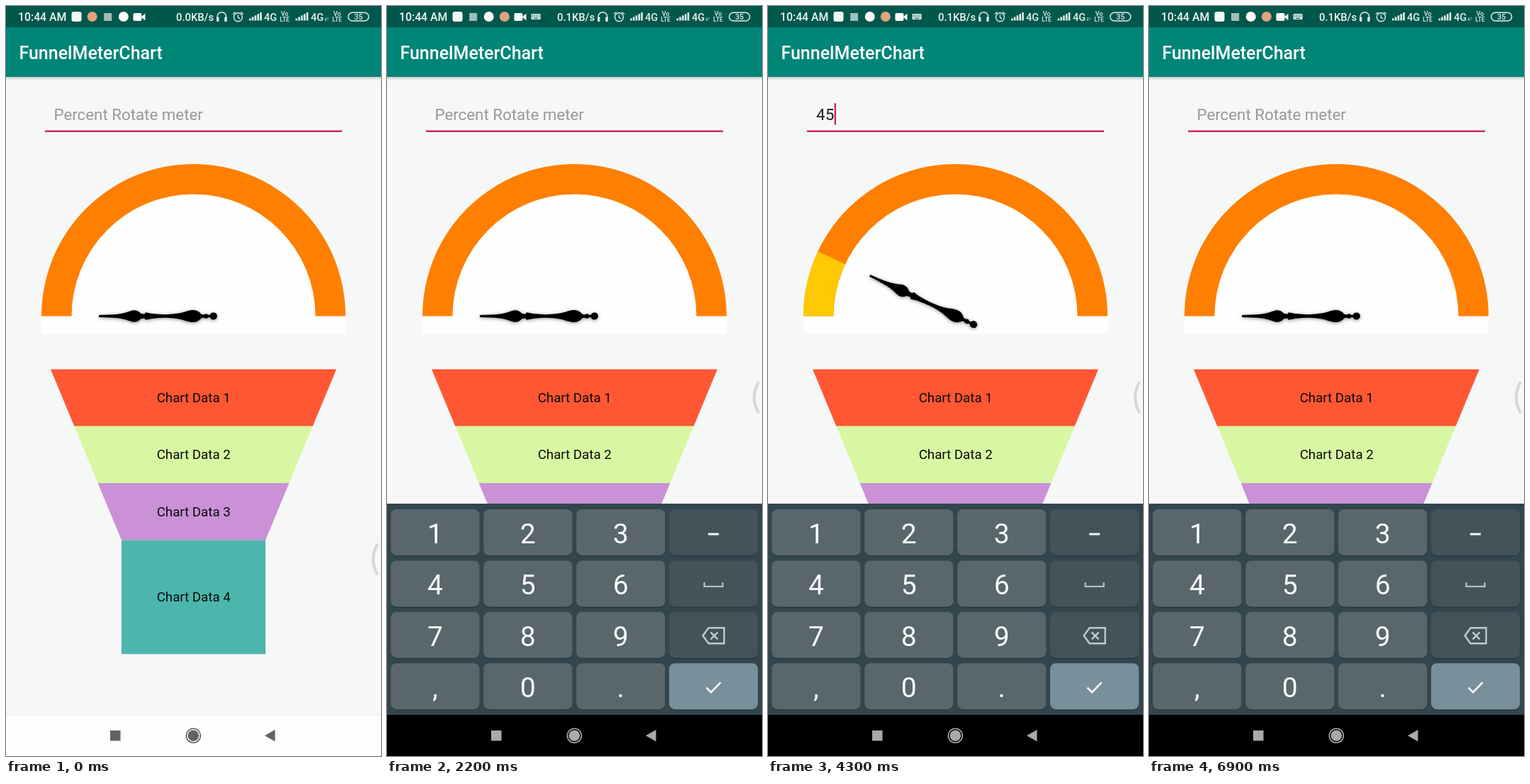
An HTML page with a canvas that plays this animation: 529x1058 px, repeating every 7000 ms.

```html
<!DOCTYPE html>
<html lang="en">
<head>
<meta charset="utf-8">
<title>FunnelMeterChart</title>
<style>
html, body { margin: 0; width: 100%; height: 100%; overflow: hidden; background: #f6f8f8; }
canvas { display: block; width: 100vw; height: 100vh; }
</style>
</head>
<body>
<canvas id="stage" width="529" height="1058"></canvas>
<script>
const ctx = document.getElementById('stage').getContext('2d');
const LOOP = 7000, STEP = 100, BLINK = 522, MS_PER_PERCENT = 10;
const FONT = 'Roboto, "Noto Sans", sans-serif';
const CX = 264.5, CY = 437.5, R_OUT = 214.5, R_IN = 172;

// [time, field text]
const edits = [[400, ''], [3760, '4'], [4160, '45'], [5260, '4'], [6160, '']];
// [from, to, key row, key column]
const presses = [
  [2500, 2900, 2, 3], [3600, 3800, 1, 0], [4000, 4200, 1, 1],
  [5200, 5400, 2, 3], [6100, 6300, 2, 3]
];
const KEYS = [['1', '2', '3', 'minus'], ['4', '5', '6', 'space'],
  ['7', '8', '9', 'delete'], [',', '0', '.', 'enter']];

function rect(x, y, w, h, color) {
  ctx.fillStyle = color;
  ctx.fillRect(x, y, w, h);
}

function text(str, x, y, size, color, align = 'left', weight = 400) {
  ctx.font = `${weight} ${size}px ${FONT}`;
  ctx.textAlign = align;
  ctx.fillStyle = color;
  ctx.fillText(str, x, y);
}

function disc(x, y, r, color) {
  ctx.fillStyle = color;
  ctx.beginPath();
  ctx.arc(x, y, r, 0, Math.PI * 2);
  ctx.fill();
}

function round(x, y, w, h, r, color) {
  ctx.fillStyle = color;
  ctx.beginPath();
  ctx.roundRect(x, y, w, h, r);
  ctx.fill();
}

function fillPath(d, color) {
  ctx.fillStyle = color;
  ctx.fill(new Path2D(d));
}

function strokePath(d, color, width) {
  ctx.strokeStyle = color;
  ctx.lineWidth = width;
  ctx.stroke(new Path2D(d));
}

function signal(x) {
  for (let i = 0; i < 5; i++) {
    const h = 3 + i * 2.1;
    rect(x + i * 3.8, 20.5 - h, 2.6, h, '#e6f0ee');
  }
}

function volte(x) {
  text('Vo', x, 13.5, 9, '#e6f0ee', 'center', 500);
  text('LTE', x, 22, 8.5, '#e6f0ee', 'center', 500);
}

const statusIcons = {
  app: x => round(x - 7, 8, 14, 14, 3, '#f2f8f7'),
  pulse: x => disc(x, 15, 7, '#e5a27e'),
  mini: x => rect(x - 5.5, 10, 11, 11, '#9fc0ba'),
  chat: x => disc(x, 15, 7, '#ffffff'),
  video: x => {
    round(x - 8.5, 10, 12, 11, 2, '#fff');
    fillPath(`M${x + 3} 15.5L${x + 8.5} 10.5V20.5Z`, '#fff');
  },
  keys: x => {
    round(x - 6.5, 11, 13, 8, 1, '#dcebe8');
    for (let i = 0; i < 8; i++) {
      rect(x - 5 + (i % 4) * 2.8, 12.5 + (i >> 2) * 2.2, 1.3, 1.2, '#00574b');
    }
    rect(x - 3, 17, 6, 1, '#00574b');
  }
};

function statusBar(t) {
  rect(0, 0, 529, 30, '#00574b');
  text('10:44 AM', 17, 21, 15.8, '#f0f7f6', 'left', 500);
  const order = t < 1700 ? ['app', 'pulse', 'mini', 'chat', 'video']
    : ['app', 'mini', 'chat', 'pulse', 'video', 'keys'];
  order.forEach((name, i) => statusIcons[name](99.5 + i * 22.1));
  text(t < 1800 ? '0.0KB/s' : '0.1KB/s', 240, 20.5, 14.8, '#f0f7f6', 'left', 500);

  const ink = '#e6f0ee';
  strokePath('M298 18V15A6.3 6.3 0 0 1 310.6 15V18', ink, 1.5);
  round(297, 15.5, 3.4, 6.5, 1, ink);
  round(308.2, 15.5, 3.4, 6.5, 1, ink);
  strokePath('M333.4 15.8A6 6 0 1 0 321.4 15.8A6 6 0 1 0 333.4 15.8M327.4 12.5V16.3L330 17.8M320 11.5L323.5 8.5M334.8 11.5L331.3 8.5', ink, 1.4);
  signal(343);
  text('4G', 364, 20.5, 14.6, ink, 'left', 500);
  volte(393);
  signal(408.5);
  text('4G', 430, 20.5, 14.6, ink, 'left', 500);
  strokePath('M451 16V20.5M449.8 19L451 20.5L452.2 19', ink, 0.8);
  strokePath('M454 20.5V16M452.8 17.5L454 16L455.2 17.5', '#7fa9a3', 0.8);
  volte(467);
  ctx.strokeStyle = ink;
  ctx.lineWidth = 1.4;
  ctx.beginPath();
  ctx.roundRect(482.7, 9.2, 29, 11.8, 5.9);
  ctx.stroke();
  text('35', 497.2, 18.8, 10.5, ink, 'center', 500);
}

function header(t) {
  rect(0, 30, 529, 70, '#008577');
  const shade = ctx.createLinearGradient(0, 100, 0, 105);
  shade.addColorStop(0, 'rgba(0,0,0,.18)');
  shade.addColorStop(1, 'rgba(0,0,0,0)');
  rect(0, 100, 529, 5, shade);
  text('FunnelMeterChart', 18.5, 74.5, 25, '#fff', 'left', 500);
  statusBar(t);
}

function field(t, [since, value]) {
  if (value) text(value, 68, 161, 22.5, '#1c1c1c');
  else text('Percent Rotate meter', 67.5, 161, 22.3, '#979998');
  rect(55, 175.5, 419, 2.3, '#cf1655');
  if (t >= 400 && (t - since) % (2 * BLINK) < BLINK) {
    rect(68.5 + value.length * 12.6, 137, 2.2, 30.5, '#cf1655');
  }
}

function ring(from, to, color) {
  ctx.fillStyle = color;
  ctx.beginPath();
  ctx.arc(CX, CY, R_OUT, from, to);
  ctx.arc(CX, CY, R_IN, to, from, true);
  ctx.fill();
}

// Upper half of the hand, mirrored to make the whole.
const hand = new Path2D();
const half = new Path2D('M-134 0V-1.5C-112 -1.8 -100 -3 -90 -7C-84 -9.5 -78 -8 -74.5 -3.4' +
  'Q-72 -3.8 -70 -2.8L-68 -5.2L-59 -3.4Q-36 -1 -20 -4.2C-10 -6.5 -8 -8.6 0 -8.6C5 -8.6 8 -5.5 11 -2.6' +
  'Q14 -1.5 16 -3Q18.5 -4 20 -1.8H22.8A5.2 5.2 0 0 1 32.8 0Z');
hand.addPath(half);
hand.addPath(half, new DOMMatrix([1, 0, 0, -1, 0, 0]));

function gauge(percent) {
  const turn = percent * Math.PI / 100;
  ctx.save();
  ctx.beginPath();
  ctx.rect(50, 223, 429, 239);
  ctx.clip();
  disc(CX, CY, R_OUT - 1, '#fdfefd');
  rect(50, 437, 429, 25, '#fdfefd');
  ring(Math.PI, Math.PI * 2, '#ff7f00');
  if (turn) ring(Math.PI, Math.PI + turn, '#fec802');
  ctx.translate(CX + 0.5, CY);
  ctx.rotate(turn);
  ctx.shadowColor = 'rgba(0,0,0,.45)';
  ctx.shadowBlur = 5;
  ctx.shadowOffsetY = 1;
  ctx.fillStyle = '#000';
  ctx.fill(hand);
  ctx.restore();
}

function funnel() {
  const colors = ['#ff5733', '#d8f7a2', '#ca91d7', '#4db6ac'];
  colors.forEach((color, i) => {
    const y = 512.5 + i * 80.3, y2 = i < 3 ? y + 80.3 : 914.3;
    const a = 63 + i * 33.3, b = i < 3 ? a + 33.3 : a;
    fillPath(`M${a} ${y}H${529 - a}L${529 - b} ${y2}H${b}Z`, color);
    text('Chart Data ' + (i + 1), 264.7, (y + y2) / 2 + 6.3, 18.7, '#0a0a0a', 'center');
  });
}

function sideHandle(t) {
  const y = t < 1300 ? 780.5 : 552;
  ctx.lineCap = 'round';
  strokePath(`M523.5 ${y - 20.5}Q512.5 ${y} 523.5 ${y + 20.5}`, '#d5d8d7', 4);
  ctx.lineCap = 'butt';
}

const keyIcons = {
  minus: (x, y) => rect(x - 7.5, y, 15, 3, '#f5f7f7'),
  space: (x, y) => strokePath(`M${x - 13} ${y - 3}v6h26v-6`, '#b4bcbf', 2.4),
  delete: (x, y, ink) => strokePath(`M${x - 15} ${y}l8 -11h22v22h-22Z` +
    `M${x - 4} ${y - 5}l10 10m0 -10l-10 10`, ink, 2.4),
  enter: (x, y) => strokePath(`M${x - 10} ${y + 1}l6.5 6.5l13.5 -14`, '#fff', 2.6)
};

function keyboard(t) {
  const p = Math.min(1, (t - 1300) / 330);
  const top = 702 + 356 * (1 - p) ** 2;
  rect(0, top, 529, 298, '#33464e');
  rect(0, top + 298, 529, 358, '#000');
  KEYS.forEach((row, r) => row.forEach((name, c) => {
    const x = 5.3 + c * 130.9, y = top + 8 + r * 72.4, w = 125.2, h = 65;
    const down = presses.some(([a, b, pr, pc]) => t >= a && t < b && pr === r && pc === c);
    const base = name === 'enter' ? '#78909c' : c === 3 ? '#435359' : '#59676c';
    round(x, y + 1.5, w, h, 8, '#293a41');
    round(x, y, w, h, 8, down ? '#bbc3c5' : base);
    const mx = x + w / 2, my = y + h / 2;
    if (keyIcons[name]) keyIcons[name](mx, my + 1, down ? '#e6eaeb' : '#c3cacd');
    else text(name, mx, my + 15.3, 39, '#fafbfb', 'center');
  }));
}

function navIcons(color) {
  rect(147, 1022, 14.5, 14.5, color);
  disc(264.3, 1029.3, 7.8, color);
  strokePath('M274.3 1029.3a10 10 0 1 0 -20 0a10 10 0 1 0 20 0', color, 1.6);
  fillPath('M365 1029.3L379.5 1021V1037.6Z', color);
}

function draw(t) {
  const edit = edits.filter(e => e[0] <= t).pop() || edits[0];
  const percent = Math.min(Number(edit[1]), Math.max(0, t - edit[0]) / MS_PER_PERCENT);
  rect(0, 0, 529, 1058, '#f6f8f8');
  header(t);
  field(t, edit);
  gauge(percent);
  funnel();
  rect(0, 1000, 529, 58, '#fdfefe');
  rect(0, 999.5, 529, 1, '#eceeee');
  sideHandle(t);
  if (t >= 1300) keyboard(t);
  navIcons(t < 1400 ? '#626262' : '#a8abac');
}

const start = performance.now();
function frame() {
  const t = (performance.now() - start) % LOOP;
  draw(Math.floor(t / STEP) * STEP);
  requestAnimationFrame(frame);
}
frame();
</script>
</body>
</html>
```
